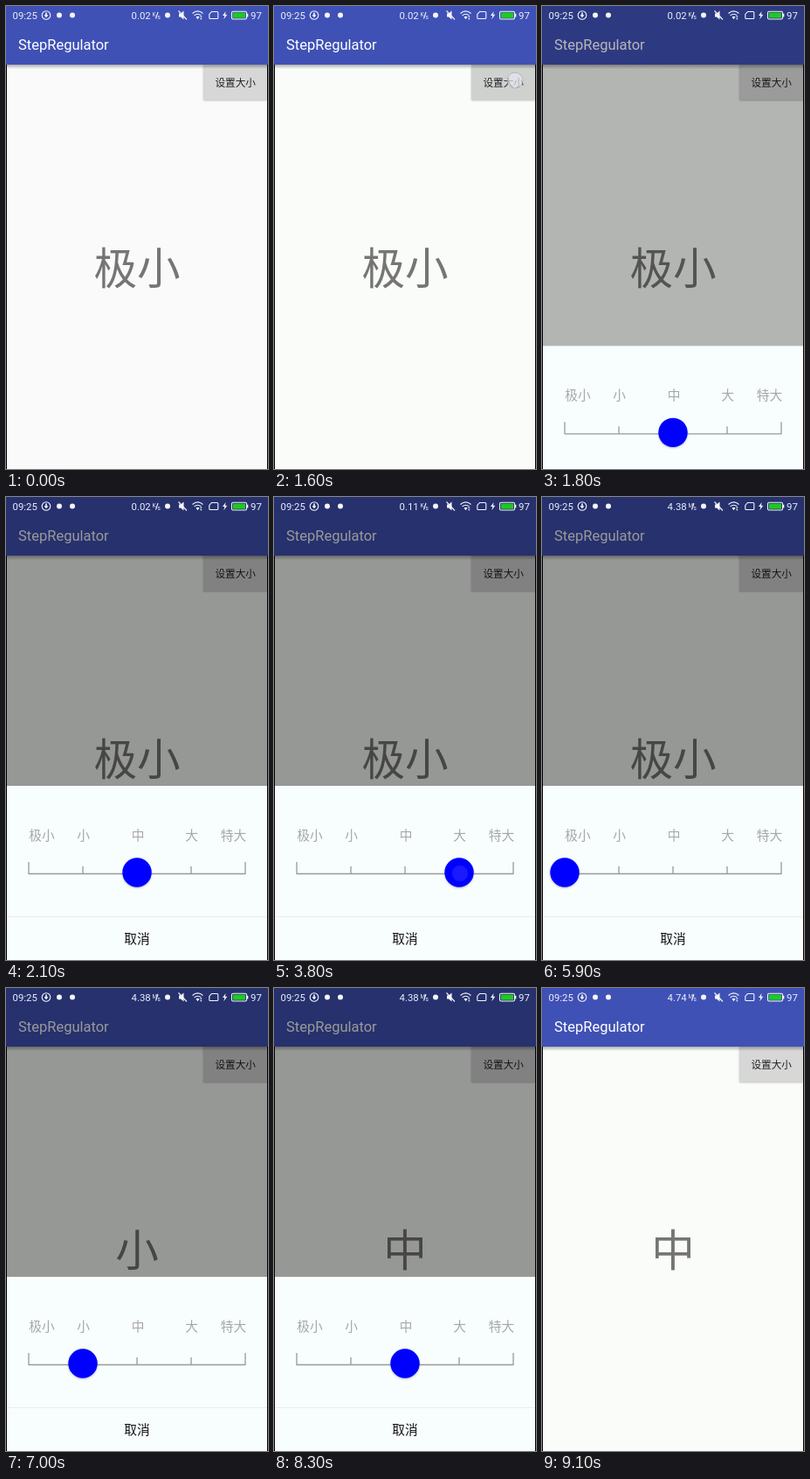
These frames come from a looping animation (300 px wide and 529 px high, 9200 ms). An HTML page:

```html
<!DOCTYPE html>
<html lang="zh-CN">
<head>
<meta charset="utf-8">
<title>Size picker</title>
<style>
  html, body { margin: 0; width: 100%; height: 100%; overflow: hidden; background: #fafafa; }
  svg { display: block; width: 100%; height: 100%; }
  text { font-family: Roboto, "Noto Sans CJK SC", "Noto Sans CJK", sans-serif; }
  .mid { text-anchor: middle; }
  .status { font-size: 11.4px; fill: #eceef8; }
  .unit { font-size: 6.5px; fill: #eceef8; }
  .icon { fill: #f4f5fb; }
  .line { fill: none; stroke: #f4f5fb; stroke-width: 1.1; }
  .label { font-size: 14.7px; fill: #a6a8a7; }
</style>
</head>
<body>
<svg viewBox="0 0 300 529" preserveAspectRatio="none">
  <defs>
    <linearGradient id="fade" x1="0" y1="0" x2="0" y2="1">
      <stop offset="0" stop-opacity=".3"/>
      <stop offset="1" stop-opacity="0"/>
    </linearGradient>
    <filter id="soft" x="-30%" y="-30%" width="160%" height="180%">
      <feDropShadow dx="0" dy="1" stdDeviation="1.2" flood-opacity=".25"/>
    </filter>
  </defs>

  <rect id="page" width="300" height="529"/>
  <text id="value" class="mid" x="150" y="317.5" font-size="49.6" fill="#757575"></text>
  <rect id="button" x="226" y="67" width="73" height="40" filter="url(#soft)"/>
  <text class="mid" x="262.7" y="91.5" font-size="11.67" fill="#212121">设置大小</text>
  <path d="M.5 67V529M299.5 67V529" stroke="#000"/>
  <rect width="300" height="67" fill="#3f51b5"/>
  <rect y="67" width="300" height="5" fill="url(#fade)"/>
  <text x="14" y="50" font-size="16.5" fill="#fff">StepRegulator</text>
  <rect id="dim" width="300" height="529"/>

  <g id="statusBar">
    <text class="status" x="7.5" y="14.5">09:25</text>
    <circle class="line" cx="46" cy="10.5" r="4.8"/>
    <path class="icon" d="M45.2 7.5h1.6v2.7h1.7L46 13.2l-2.5-3h1.7z"/>
    <circle class="icon" cx="61" cy="10.5" r="3"/>
    <circle class="icon" cx="76" cy="10.5" r="3"/>
    <text id="speed" class="status" x="143.5" y="14.5"></text>
    <text id="unit" class="unit" x="167.5" y="11.5"></text>
    <text class="unit" x="173.5" y="14.5">s</text>
    <path class="line" d="M174 7l-2.5 7.5" stroke-width=".8"/>
    <circle class="icon" cx="185" cy="10.5" r="3"/>
    <path class="icon" d="M198 8.5h2l3.5-3v10l-3.5-3h-2z"/>
    <path class="line" d="M197.5 5.5l9.5 10"/>
    <path class="line" d="M213.5 8.5q6-5.2 12 0M215.5 10.9q4-3.4 8 0"/>
    <path class="icon" d="M217.5 12.5q2-1.4 4 0l-2 2.8zM222 13l1.3-1.8 1.3 1.8zM222 14l1.3 1.8 1.3-1.8z"/>
    <path class="line" d="M235.5 6.5h6.3q1 0 1 1v6q0 1-1 1h-8q-1 0-1-1v-4z"/>
    <path class="icon" d="M251.6 6l-3.6 5h2.3l-1 4.2 4-5.5h-2.4z"/>
    <rect class="line" x="258.5" y="6.2" width="17" height="8.8" rx="1.5"/>
    <rect x="260" y="7.6" width="14" height="6" fill="#1ecb1e"/>
    <rect class="icon" x="276" y="8.8" width="1.3" height="3.6"/>
    <text class="status" x="280" y="14.5">97</text>
  </g>

  <g id="sheet">
    <rect x="1" y="330" width="298" height="199" fill="#f8fdfd"/>
    <g id="labels"></g>
    <path id="scale" fill="none" stroke="#979a99" stroke-width="1.3"/>
    <circle id="knob" cy="429" r="16.7" fill="#00f" filter="url(#soft)"/>
    <path d="M1 479.5H299" stroke="#e9eeed"/>
    <text class="mid" x="150" y="510" font-size="14.7" fill="#151515">取消</text>
  </g>
  <circle id="touch" r="9" fill="#e8e8f0" stroke="#a5a9b8"/>
</svg>
<script>
const LOOP = 9200;
const el = id => document.getElementById(id);
const names = ['极小', '小', '中', '大', '特大'];
const labelX = [41, 88.5, 151, 212.7, 260.5];
const stopX = i => 26 + 62 * i;

// Each drag moves the knob to a stop; the word changes on release.
const drags = [
  { start: 3450, release: 3900, to: 3 },
  { start: 4350, release: 4800, to: 4 },
  { start: 5400, release: 5900, to: 0 },
  { start: 6350, release: 6800, to: 1 },
  { start: 7350, release: 7800, to: 2 }
];
const taps = [
  { start: 1500, release: 1700, x: 276, y: 85 },
  { start: 8400, release: 8550, x: 152, y: 503 }
];
const speeds = [[0, '0.02', 'K'], [2800, '0.11', 'K'], [5800, '4.38', 'M'], [8600, '4.74', 'M']];

const progress = (t, start, end) => Math.min(1, Math.max(0, (t - start) / (end - start)));
const easeOut = p => 1 - (1 - p) ** 3;
const smooth = p => p * p * (3 - 2 * p);
const set = (id, attrs) => {
  for (const key in attrs) el(id).setAttribute(key, attrs[key]);
};

el('labels').innerHTML = names.map((name, i) =>
  `<text class="label mid" x="${labelX[i]}" y="392">${name}</text>`).join('');
set('scale', {
  d: 'M26 430.5H274' + names.map((_, i) => `M${stopX(i)} 431V${i % 4 ? 422 : 417}`).join('')
});

function render(t) {
  const shown = easeOut(progress(t, 1700, 2000)) - smooth(progress(t, 8550, 8800));
  let knobX = stopX(2), word = names[0], touch = null;

  for (const { start, release, to } of drags) {
    if (t < start) break;
    knobX += (stopX(to) - knobX) * smooth(progress(t, start, release - 120));
    if (t >= release) word = names[to];
    else touch = { x: knobX + 1, y: 430, opacity: .11 };
  }
  for (const { start, release, x, y } of taps) {
    if (t >= start && t < release) touch = { x, y, opacity: .7 };
  }

  const [, speed, unit] = speeds.filter(([from]) => t >= from).pop();
  el('value').textContent = word;
  el('speed').textContent = speed;
  el('unit').textContent = unit;
  set('page', { fill: t < 1500 ? '#fafafa' : '#f9fcf8' });
  set('button', { fill: t >= 1500 && t < 1700 ? '#cfd1cf' : '#d6d7d6' });
  set('dim', { opacity: .4 * shown });
  set('sheet', { transform: `translate(0 ${200 * (1 - shown)})` });
  set('knob', { cx: knobX });
  set('touch', touch ? { cx: touch.x, cy: touch.y, opacity: touch.opacity } : { opacity: 0 });
}

const origin = performance.now();
function tick() {
  render((performance.now() - origin) % LOOP);
  requestAnimationFrame(tick);
}
tick();
</script>
</body>
</html>
```
